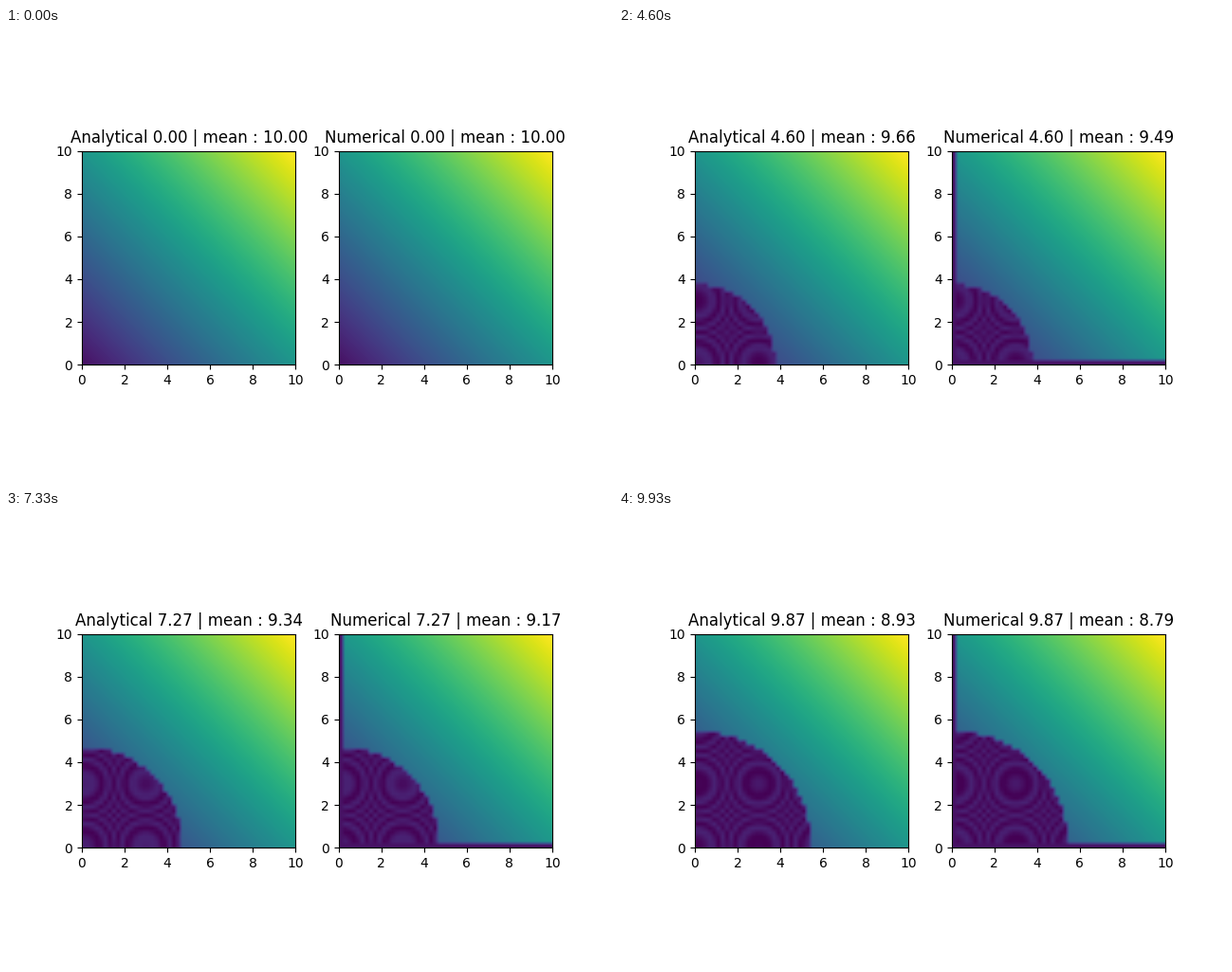
A matplotlib script that plays this animation: 640 px wide and 480 px high, repeating every 10000 ms.

```python
import numpy as np
import matplotlib.pyplot as plt
from matplotlib.animation import FuncAnimation

FRAMES = 150
LOOP_MS = 10000
SIZE = 10
POINTS = 50
OMEGA = 5 * np.pi
SPREAD = 3  # the front sits at r^2 = SPREAD * t

axis = np.linspace(0, SIZE, POINTS)
x, y = np.meshgrid(axis, axis)
start = x + y
delay = (x**2 + y**2) / SPREAD


def analytical(t):
    return np.where(delay < t, np.sin(OMEGA * (t - delay)), start)


def numerical(t):
    u = analytical(t)
    if t > 0:
        # fixed boundary on the left and bottom edges
        u[0, :] = 0
        u[:, 0] = 0
    return u


def make_panel(ax):
    return ax.imshow(start, origin="lower", extent=(0, SIZE, 0, SIZE),
                     vmin=-1, vmax=20, cmap="viridis",
                     interpolation="bilinear")


fig, axes = plt.subplots(1, 2, figsize=(6.4, 4.8), dpi=100)
panels = [
    (axes[0], make_panel(axes[0]), "Analytical", analytical),
    (axes[1], make_panel(axes[1]), "Numerical", numerical),
]


def update(frame):
    t = frame * LOOP_MS / 1000 / FRAMES
    for ax, image, name, solve in panels:
        u = solve(t)
        image.set_data(u)
        ax.set_title(f"{name} {t:.2f} | mean : {u.mean():.2f}")
    return [panel[1] for panel in panels]


anim = FuncAnimation(fig, update, frames=FRAMES, interval=LOOP_MS / FRAMES,
                     init_func=lambda: update(0), repeat=True, repeat_delay=0)
plt.show()
```
